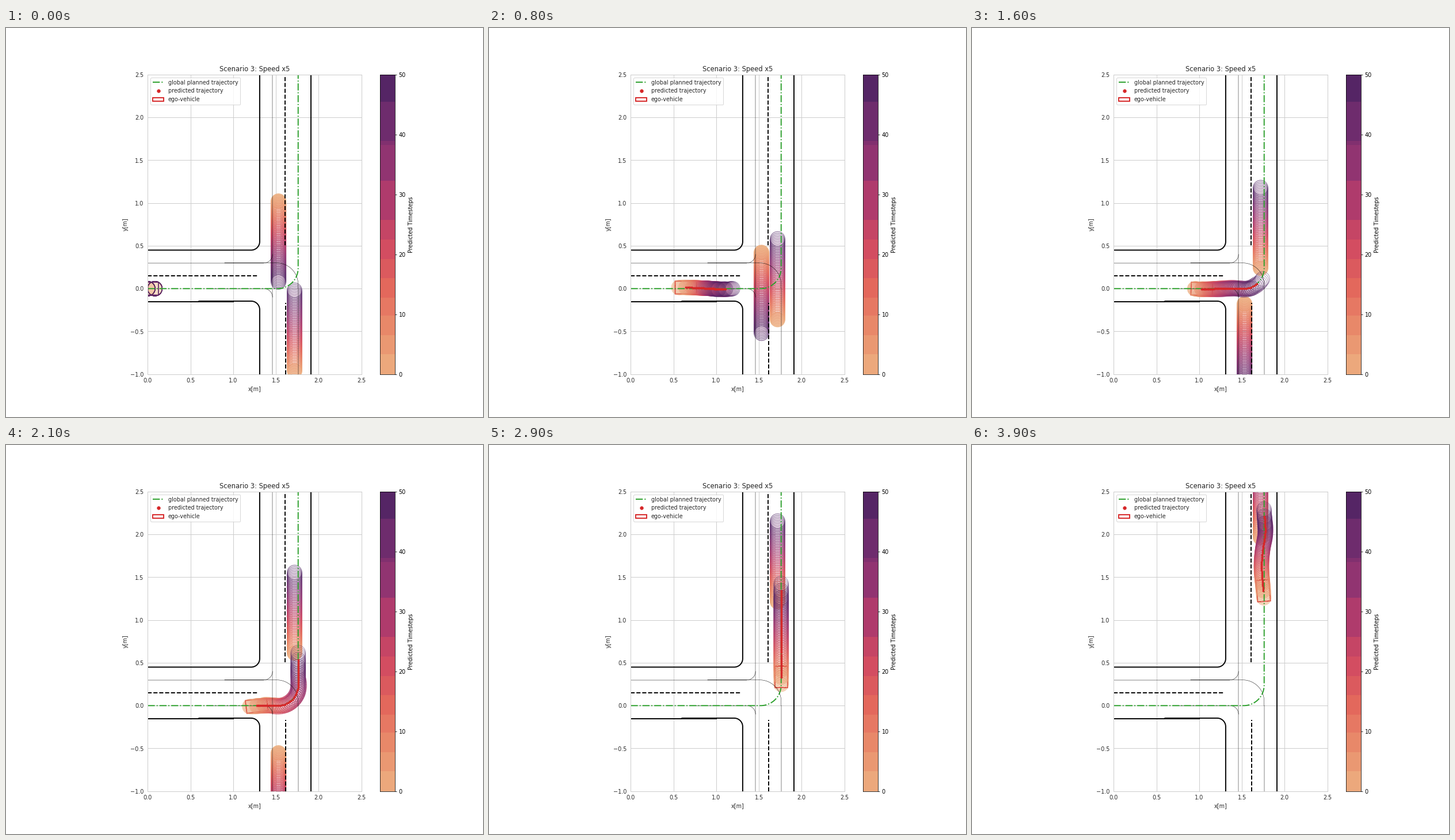
Write a matplotlib script that moves like this. It is 829x675 px and loops after 4 s.

```python
import numpy as np
import matplotlib.pyplot as plt
from matplotlib.animation import FuncAnimation
from matplotlib.collections import EllipseCollection
from matplotlib.colors import LinearSegmentedColormap
from matplotlib.lines import Line2D
from matplotlib.patches import Patch, Polygon

W, H = 829, 675
DPI = W / 12              # the figure is 12 inches wide
FRAMES, INTERVAL = 40, 100
STEPS = 51                # predicted states per vehicle
PER_FRAME = 5             # prediction steps that pass in one frame
GREEN, RED, INK = "tab:green", "tab:red", "0.15"

FLARE = LinearSegmentedColormap.from_list("flare", [
    "#edb081", "#e98d6b", "#e3685c", "#d14a61",
    "#b13c6c", "#8f3371", "#6c2b6d", "#4b2362"])

plt.rcParams["font.family"] = "DejaVu Sans"
# The tiny margin keeps the height from rounding down by a pixel.
fig = plt.figure(figsize=(W / DPI, H / DPI + 1e-9), dpi=DPI, facecolor="white")
ax = fig.add_axes([246.375 / W, 0.11, 371.25 / W, 0.77])
cax = fig.add_axes([649.74 / W, 0.11, 25.99 / W, 0.77])


# ---------- static scene ----------

def arc(cx, cy, r, start, end):
    a = np.radians(np.linspace(start, end, 30))
    return list(zip(cx + r * np.cos(a), cy + r * np.sin(a)))


def road(points, lw=2.0, ls="-", color="black"):
    x, y = zip(*points)
    ax.plot(x, y, color=color, lw=lw, ls=ls)


def draw_roads():
    road([(0, .45)] + arc(1.21, .55, .1, -90, 0) + [(1.31, 2.6)])
    road([(0, -.15), (1, -.15)])
    road([(.6, -.146)] + arc(1.21, -.246, .1, 90, 0) + [(1.31, -1.1)])
    road([(1.91, -1.1), (1.91, 2.6)])
    road([(0, .15), (1.29, .15)], ls="--")
    road([(1.61, .51), (1.61, 2.6)], ls="--")
    road([(1.614, -1), (1.614, -.17)], ls="--")

    thin = 0.5
    road([(1.46, -1.1), (1.46, 2.6)], thin)
    road([(1.76, -1.1), (1.76, 0)], thin)
    road([(0, .3), (1.36, .3)], thin)
    road([(.9, .3)] + arc(1.36, .4, .1, -90, 0), thin)
    road([(.9, .3)] + arc(1.51, .05, .25, 90, 0) + [(1.76, 0)], thin)
    road([(.75, 0)] + arc(1.36, -.1, .1, 90, 0), thin)


# ---------- ego vehicle ----------

TURN_S, TURN_R = 1.52, 0.24
QUARTER = TURN_R * np.pi / 2

KNOT_T = np.array([0, 2, 4, 6, 8, 12, 16, 18, 21, 24, 25, 29, 33, 39, 43, 49.])
KNOT_S = np.array([0, .07, .25, .45, .645, .895, 1.03, 1.11, 1.275, 1.492,
                   1.592, 1.99, 2.397, 3.0, 3.39, 3.87])
KNOT_V = np.gradient(KNOT_S, KNOT_T)
KNOT_V[0] = 0


def travelled(t):
    """Distance along the route, by cubic Hermite pieces."""
    i = np.clip(np.searchsorted(KNOT_T, t, side="right") - 1, 0, len(KNOT_T) - 2)
    h = KNOT_T[i + 1] - KNOT_T[i]
    u = (t - KNOT_T[i]) / h
    a, b = KNOT_S[i], KNOT_S[i + 1]
    va, vb = KNOT_V[i] * h, KNOT_V[i + 1] * h
    return (a + u * va + u**2 * (3 * (b - a) - 2 * va - vb)
            + u**3 * (2 * (a - b) + va + vb))


def route(s):
    th = np.clip((s - TURN_S) / TURN_R, 0, np.pi / 2)
    x = np.minimum(s, TURN_S) + TURN_R * np.sin(th)
    y = TURN_R * (1 - np.cos(th)) + np.maximum(s - TURN_S - QUARTER, 0)
    return x, y, th


def bump(s, centre, width):
    return np.exp(-((s - centre) / width) ** 2)


def drift(s, late):
    """Sideways error, positive to the left."""
    early = .013 * bump(s, .65, .22) - .006 * bump(s, 1.06, .1)
    weave = .03 * bump(s, 3.287, .28) - .016 * bump(s, 3.687, .15)
    return early + late * weave


def ego_poses(k):
    if k == 0:
        s = np.zeros(STEPS)
    else:
        s = travelled(k + np.arange(STEPS) / PER_FRAME)
    late = np.clip((k - 34) / 5, 0, 1)
    x, y, th = route(s)
    off = drift(s, late)
    slope = (drift(s + .01, late) - drift(s - .01, late)) / .02
    x, y = x - off * np.sin(th), y + off * np.cos(th)
    return x, y, th + slope + .13 * bump(s, 1.3, .11)


# ---------- covering circles ----------

def cover(x, y, th, gap=.0833):
    """Three circle centres along the body, step by step."""
    d = np.array([-gap, 0, gap])
    cx = x[:, None] + d * np.cos(th)[:, None]
    cy = y[:, None] + d * np.sin(th)[:, None]
    return np.column_stack([cx.ravel(), cy.ravel()])


def oncoming(x, y0, heading, k):
    """One circle per step for a car on the vertical road."""
    y = y0 + heading * (.075 * k + .0188 * np.arange(STEPS))
    return np.column_stack([np.full(STEPS, x), y])


class Trail:
    """Rings of a prediction; the circles of its first step are filled."""

    def __init__(self, diameter, per_step, lw, fill_alpha):
        self.per_step = per_step
        rgba = FLARE(np.repeat(np.linspace(0, 1, STEPS), per_step))
        rgba[:, 3] = np.repeat(np.linspace(*self.fade(per_step), STEPS), per_step)
        self.fill = self.circles(diameter, per_step, edgecolors="none", zorder=.9,
                                 facecolors=[FLARE(0.0, alpha=fill_alpha)])
        self.rings = self.circles(diameter, per_step * STEPS, facecolors="none",
                                  edgecolors=rgba, linewidths=lw, zorder=1)

    @staticmethod
    def fade(per_step):
        return (.6, .45) if per_step > 1 else (.95, .55)

    @staticmethod
    def circles(diameter, n, **style):
        d = np.full(n, diameter)
        c = EllipseCollection(d, d, np.zeros(n), units="xy",
                              offsets=np.zeros((n, 2)),
                              offset_transform=ax.transData, **style)
        return ax.add_collection(c, autolim=False)

    def move(self, centres):
        self.rings.set_offsets(centres)
        self.fill.set_offsets(centres[:self.per_step])


down = Trail(.172, 1, lw=1.8, fill_alpha=.8)
up = Trail(.172, 1, lw=1.4, fill_alpha=.7)
own = Trail(.1716, 3, lw=1, fill_alpha=.45)
body = Polygon(np.zeros((4, 2)), closed=True, fill=False, lw=1.8, zorder=.95)
ax.add_patch(body)

draw_roads()
gx, gy, _ = route(np.concatenate([[0], np.linspace(TURN_S, TURN_S + QUARTER, 40),
                                  [4.3]]))
ax.plot(gx, gy, color=GREEN, lw=2, ls="-.")
dots, = ax.plot([], [], "o", color=RED, ms=4, mew=0, zorder=3)


# ---------- axes, legend, colour bar ----------

ax.set_xlim(0, 2.5)
ax.set_ylim(-1, 2.5)
ax.set_xticks(np.arange(0, 2.6, .5))
ax.set_yticks(np.arange(-1, 2.6, .5))
ax.set_axisbelow(True)
ax.grid(color="0.8", lw=1)
ax.tick_params(left=False, bottom=False, labelcolor=INK, labelsize=10)
for spine in ax.spines.values():
    spine.set_color("0.8")
    spine.set_linewidth(1)
ax.set_xlabel("x[m]", color=INK, fontsize=10)
ax.set_ylabel("y[m]", color=INK, fontsize=10)
ax.set_title("Scenario 3: Speed x5", color=INK, fontsize=12)
ax.legend(handles=[
    Line2D([], [], color=GREEN, lw=2, ls="-.", label="global planned trajectory"),
    Line2D([], [], color=RED, marker="o", ms=6, mew=.5, ls="",
           label="predicted trajectory"),
    Patch(fill=False, edgecolor=RED, lw=2, label="ego-vehicle"),
], loc="upper left", fontsize=10, labelcolor=INK, edgecolor="0.8", framealpha=.8)

bands = np.array([0, 3.3, 6.5, 9.8, 12.8, 16, 19.2, 22.5, 25.8,
                  32.3, 38.3, 38.9, 45.5, 50])
middle = (bands[:-1] + bands[1:]) / 2
cax.pcolormesh([0, 1], bands, middle[:, None], cmap=FLARE, vmin=0, vmax=50)
cax.set_xlim(0, 1)
cax.set_ylim(0, 50)
cax.set_xticks([])
cax.set_yticks(range(0, 51, 10))
cax.yaxis.tick_right()
cax.yaxis.set_label_position("right")
cax.tick_params(labelsize=10)
cax.set_ylabel("Predicted Timesteps", fontsize=10)


# ---------- animation ----------

def draw(k):
    ego = ego_poses(k)
    down.move(oncoming(1.53, 1.02, -1, k))
    up.move(oncoming(1.718, -.96, 1, k))
    own.move(cover(*ego))

    x, y, th = (v[0] for v in ego)
    fwd = .125 * np.array([np.cos(th), np.sin(th)])
    left = .075 * np.array([-np.sin(th), np.cos(th)])
    mid = np.array([x, y])
    body.set_xy([mid - fwd + left, mid - fwd - left,
                 mid + fwd - left, mid + fwd + left])
    # At rest the stacked last step hides the red outline and dots.
    body.set_edgecolor(FLARE(.9) if k == 0 else RED)
    dots.set_data(*(([], []) if k == 0 else ego[:2]))
    return body, dots


anim = FuncAnimation(fig, draw, frames=FRAMES, interval=INTERVAL,
                     init_func=lambda: draw(0), repeat=True, repeat_delay=0)
plt.show()
```
